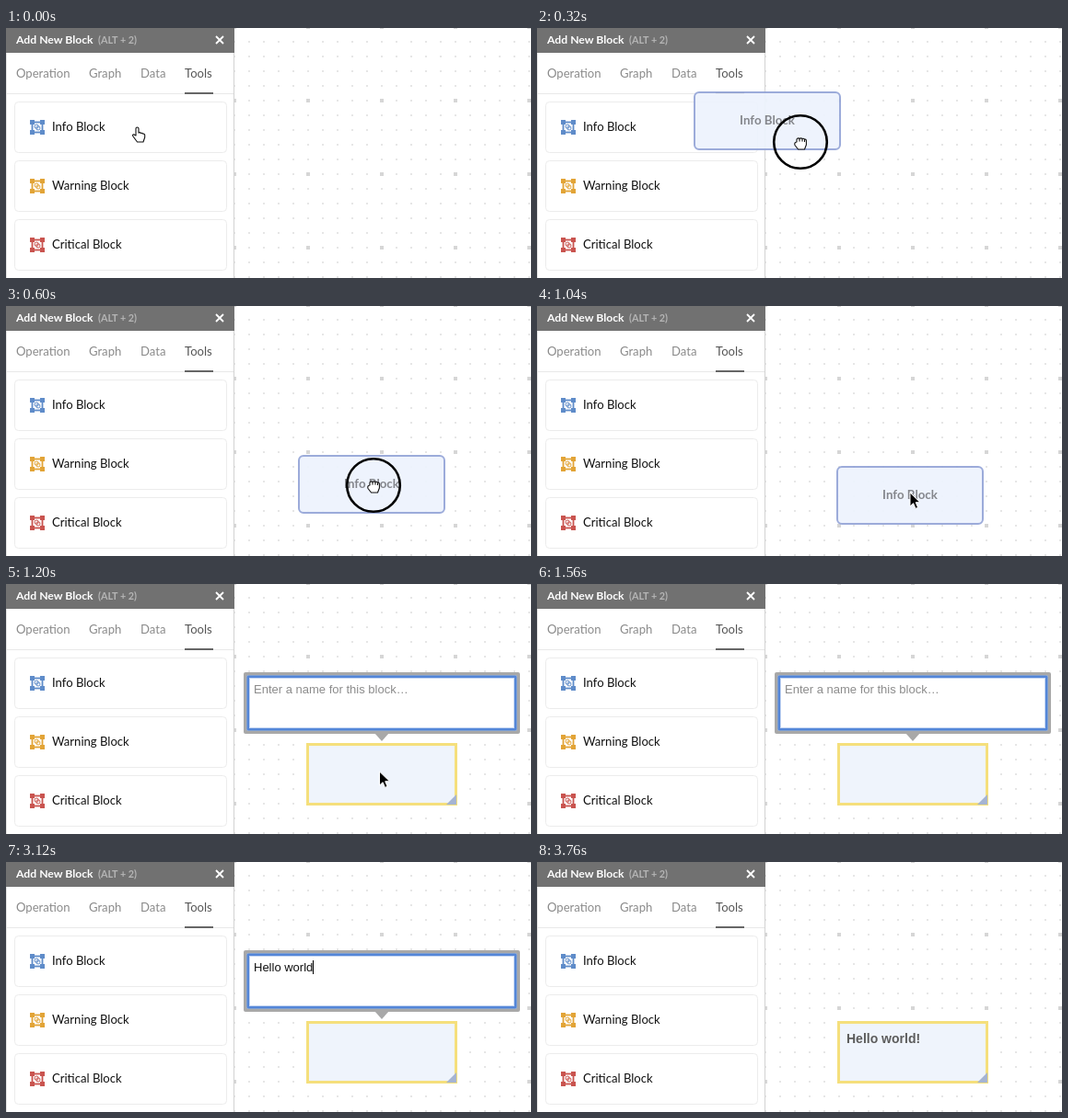
An HTML page for the animation above (4.72 s loop, 570x272 px).

```html
<!DOCTYPE html>
<html lang="en">
<head>
<meta charset="utf-8">
<title>Add a block</title>
<style>
  html, body { margin: 0; width: 100%; height: 100%; overflow: hidden; background: #fff; }
  svg { display: block; width: 570px; height: 272px; }
  text { font-family: Lato, sans-serif; white-space: pre; }
  .tab { font-size: 13.1px; fill: #8b8b8b; }
  .card rect { fill: #fff; stroke: #ececec; }
  .card text { font-size: 13.1px; fill: #111; }
  .field { font: 13px "Liberation Sans", Arial, sans-serif; }
  .hand { fill: #fff; stroke: #111; stroke-width: 1.1; stroke-linejoin: round; }
</style>
</head>
<body>
<svg viewBox="0 0 570 272">
  <defs>
    <pattern id="dots" x="248" y="79" width="16" height="16" patternUnits="userSpaceOnUse" patternTransform="translate(-8 -8)">
      <rect x="7" y="7" width="2" height="2" fill="#e6e6e6"/>
    </pattern>
    <pattern id="majors" x="248" y="79" width="80" height="80" patternUnits="userSpaceOnUse" patternTransform="translate(-40 -40)">
      <rect x="38" y="38" width="4" height="4" fill="#d6d6d6"/>
    </pattern>
    <symbol id="icon" viewBox="0 0 16 16" overflow="visible">
      <g fill="none" stroke="currentColor">
        <rect x="2.5" y="2.5" width="11" height="11" stroke-width="1.8"/>
        <rect x="5.2" y="5.2" width="3.8" height="3.8" rx="1"/>
        <rect x="7" y="7" width="3.8" height="3.8" rx="1"/>
      </g>
      <path fill="currentColor" d="M0 0h5v5h-5zM11 0h5v5h-5zM0 11h5v5h-5zM11 11h5v5h-5z"/>
    </symbol>
  </defs>

  <rect width="570" height="272" fill="#fff"/>
  <rect x="248" width="322" height="272" fill="url(#dots)"/>
  <rect x="248" width="322" height="272" fill="url(#majors)"/>

  <g id="block">
    <rect x="327.5" y="174.5" width="161" height="65" fill="#eff4fc" stroke="#f5df7c" stroke-width="3"/>
    <path d="M489 229V240H478z" fill="#a5b4d2"/>
    <text id="blockName" x="336" y="197" style="font:bold 14px 'Liberation Sans',Arial,sans-serif" fill="#5c5c5c">Hello world!</text>
  </g>

  <g id="popup">
    <path d="M400 162H416L408 171z" fill="#a8a8a8"/>
    <rect x="258" y="96" width="300" height="67" rx="2" fill="#a8a8a8"/>
    <rect x="261.5" y="99.5" width="293" height="60" rx="1" fill="#fff" stroke="#7f9fd0" stroke-width="1"/>
    <rect x="263" y="101" width="290" height="57" fill="#fff" stroke="#5486d8" stroke-width="2"/>
    <rect x="264.5" y="102.5" width="287" height="54" fill="none" stroke="#c3d5f2"/>
    <text id="hint" class="field" x="269" y="119" fill="#8c8c8c">Enter a name for this block…</text>
    <text id="typed" class="field" x="269" y="119" fill="#111"></text>
    <rect id="caret" y="107" width="1" height="15" fill="#000"/>
  </g>

  <g id="panel">
    <rect width="248" height="272" fill="#fff"/>
    <rect width="248" height="27" fill="#717171"/>
    <path d="M.5 27V272" stroke="#e4e4e4"/>
    <path d="M247.5 27V272" stroke="#d2d2d2"/>
    <text x="11" y="17" font-size="12.2" font-weight="bold" fill="#fff">Add New Block</text>
    <text x="100" y="17" font-size="10.8" font-weight="bold" fill="#b5b5b5">(ALT + 2)</text>
    <path d="M228 9l8 8m0-8l-8 8" stroke="#fff" stroke-width="1.8"/>
    <path d="M1 71.5H247" stroke="#e8e8e8"/>
    <rect x="194" y="70" width="31" height="2" fill="#666"/>
    <text class="tab" x="11" y="54">Operation</text>
    <text class="tab" x="90" y="54">Graph</text>
    <text class="tab" x="146" y="54">Data</text>
    <text class="tab" x="194" y="54" style="fill:#555">Tools</text>
  </g>

  <g id="ghost" opacity=".94">
    <rect x="1" y="1" width="158" height="62" rx="5" fill="#edf3fd" stroke="#96a6d8" stroke-width="2"/>
    <text x="80" y="36" text-anchor="middle" font-size="13.3" font-weight="bold" fill="#7d7f85">Info Block</text>
  </g>
  <circle id="ring" r="28.8" fill="none" stroke="#000" stroke-width="2.6"/>
  <g id="pointer">
    <path id="point" class="hand" transform="translate(1 0)" d="M-3 1V-6.5a1.5 1.5 0 0 1 3 0V-2q1.5-1 2.5 .5q1.5-.7 2.3 .7q1.9-.3 1.9 1.5V3L5 8H-1.5L-6.3 1.5q-.6-1.5 1-1.7z"/>
    <path id="grab" class="hand" transform="translate(0 1)" d="M-4-1V-4q1.5-2 3-.5q1.5-1.2 3 0q1.5-.8 2.5 .5q1.7-.3 1.9 1.5V2L4.5 7H-2.5L-6 2.5q-1-3 2-3.5zM-1-4.5v3M2-4.5v3M4.5-4v3"/>
    <path id="arrow" d="M-2-4V11L1.6 7.7L4 13.4L6.6 12.3L4.2 6.7H9z" fill="#000" stroke="#fff"/>
  </g>
</svg>
<script>
const LOOP = 4720, STEP = 40;
const $ = id => document.getElementById(id);
const show = (id, on) => { $(id).style.display = on ? '' : 'none'; };
const move = (id, x, y) => $(id).setAttribute('transform', `translate(${x} ${y})`);

[['Info', '#5f8cc9'], ['Warning', '#e2a437'], ['Critical', '#c9544f']].forEach(([name, color], i) => {
  const y = 80 + 64 * i;
  $('panel').insertAdjacentHTML('beforeend', `<g class="card">
    <rect x="9.5" y="${y + .5}" width="230" height="55" rx="4"/>
    <use href="#icon" x="26" y="${y + 20}" width="16" height="16" color="${color}"/>
    <text x="50" y="${y + 32}">${name} Block</text></g>`);
});

// pointer position at every step of the drag
const path = [
  [143, 116], [143, 116], [146, 113], [152, 103], [165, 88], [184, 81], [215, 86],
  [252, 102], [286, 124], [314, 144], [336, 159], [353, 166], [372, 180], [390, 191],
  [399, 195], [399, 195], [401, 198], [403, 201], [405, 204], [406, 206], [407, 207]
];
const pathAt = t => path[Math.max(0, Math.min(path.length - 1, t / STEP))];

const message = 'Hello world!';
const keyTimes = [1920, 2040, 2200, 2320, 2520, 2600, 2720, 2800, 2880, 3000, 3120, 3400];
const DROP = 840, OPEN = 1080, LEAVE = 1160, HIDE = 1560, CLOSE = 3760;

// width is measured with a trailing space kept
const pen = document.createElement('canvas').getContext('2d');
pen.font = '13px "Liberation Sans", Arial, sans-serif';

function draw(t) {
  const [x, y] = pathAt(t);
  const [gx, gy] = pathAt(t - STEP);
  const pressed = t >= STEP && t < DROP;
  const drift = Math.max(0, Math.min(1, (t - LEAVE) / (HIDE - LEAVE)));
  const ease = drift * drift * (3 - 2 * drift);

  show('ghost', t >= 2 * STEP && t < OPEN);
  move('ghost', gx - 82, gy - 33);
  show('ring', pressed);
  move('ring', x, y);
  show('pointer', t < HIDE);
  move('pointer', x + 18 * ease, y + 37 * ease);
  show('point', t < STEP);
  show('grab', pressed);
  show('arrow', t >= DROP);

  show('block', t >= OPEN);
  show('blockName', t >= CLOSE);
  show('popup', t >= OPEN && t < CLOSE);
  const text = message.slice(0, keyTimes.filter(k => t >= k).length);
  show('hint', !text);
  show('caret', text);
  $('typed').textContent = text;
  $('caret').setAttribute('x', Math.round(269 + pen.measureText(text).width));
}

const start = performance.now();
function tick() {
  const t = (performance.now() - start) % LOOP;
  draw(Math.floor(t / STEP) * STEP);
  requestAnimationFrame(tick);
}
tick();
</script>
</body>
</html>
```
